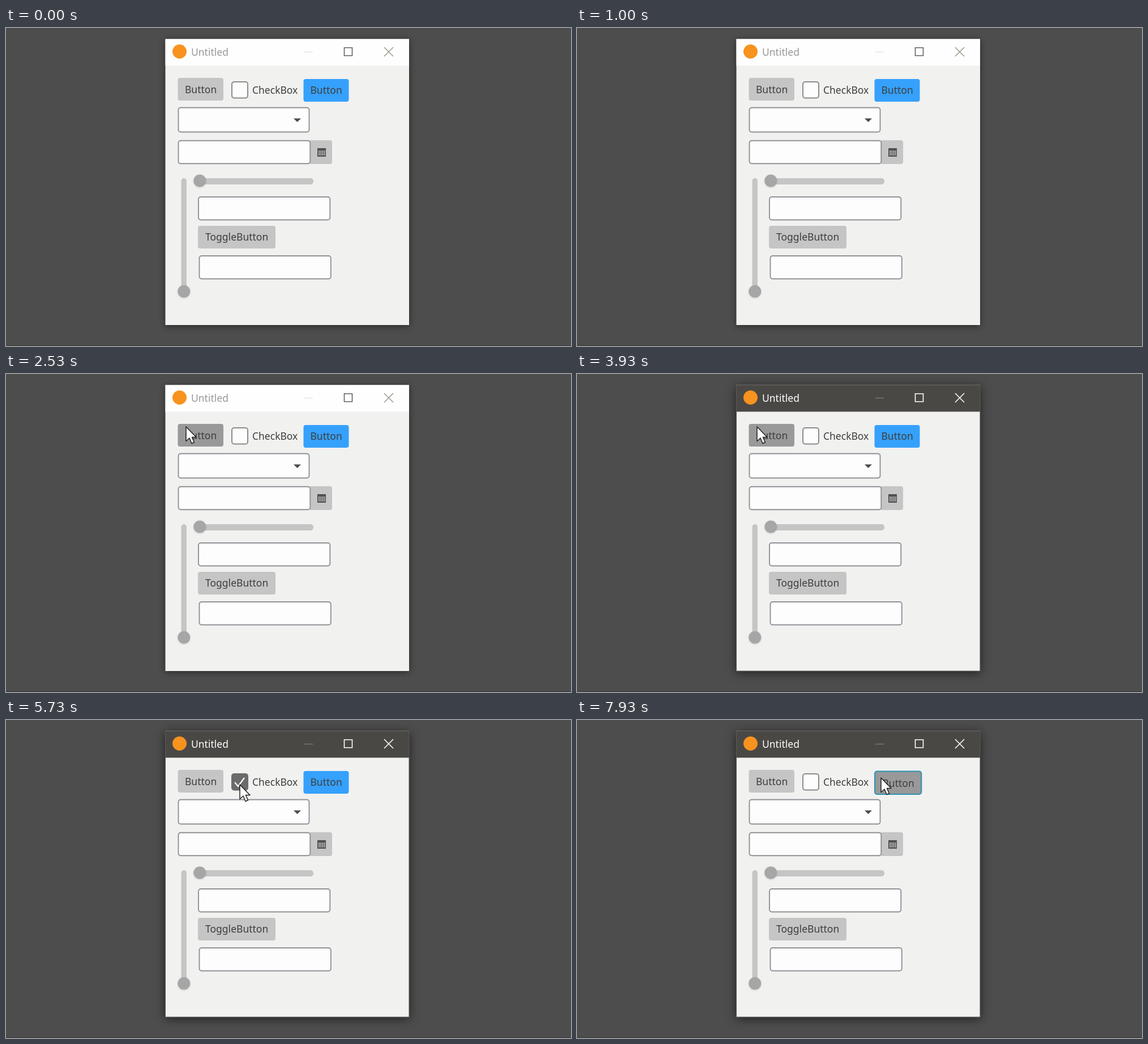
These frames come from a looping animation (998 px wide and 561 px high, 8 s). An HTML page:

```html
<!DOCTYPE html>
<html lang="en">
<head>
<meta charset="utf-8">
<style>
  html, body { margin: 0; width: 100%; height: 100%; overflow: hidden; background: #4d4d4d; }
  svg { display: block; }
  text { font: 17.5px "Noto Sans", "Open Sans", sans-serif; fill: #3e3e3e; }
  .face { fill: #c5c5c5; }
  .field { fill: #fdfdfd; stroke: #929095; stroke-width: 1.9; }
  .thumb { fill: #a6a6a6; filter: drop-shadow(0 1px 1.5px #0002); }
  #shadow { fill: #f1f1f0; filter: drop-shadow(0 2px 6px #0007); }
  #bar { fill: #fefefe; }
  #title { fill: #989898; }
  #minimize { stroke: #e6e6df; }
  #maximize { stroke: #62625e; }
  #close { stroke: #9b9b91; }
  #frame { stroke: none; }
  .active #shadow { filter: drop-shadow(0 3px 9px #0009); }
  .active #bar { fill: #4a4845; }
  .active #title { fill: #fff; }
  .active #minimize { stroke: #77736f; }
  .active #maximize, .active #close { stroke: #fff; }
  .active #frame { stroke: #5d5b59; }
</style>
</head>
<body>
<svg id="stage" width="998" height="561" viewBox="0 0 998 561">
  <rect width="998" height="561" fill="#4d4d4d"/>
  <rect y="560" width="998" height="1" fill="#383838"/>

  <rect id="shadow" x="281.5" y="19.5" width="430.500" height="504.500"/>
  <rect id="bar" x="281.5" y="19.5" width="430.500" height="47"/>
  <rect id="frame" x="281.5" y="19" width="430.500" height="505" fill="none"/>
  <circle cx="306.5" cy="41.5" r="12.5" fill="#f7931e"/>
  <text id="title" x="327" y="49">Untitled</text>
  <g fill="none" stroke-width="1.6">
    <path id="minimize" d="M527 42.5h15"/>
    <path id="maximize" d="M597.5 34.7h14v14h-14z"/>
    <path id="close" d="M668 34l16 16m0-16l-16 16"/>
  </g>

  <rect id="plain" x="303.5" y="88" width="80.5" height="40" rx="4"/>
  <text x="316" y="114.5">Button</text>
  <rect id="box" x="399" y="95" width="28" height="28.5" rx="4" stroke-width="2"/>
  <path id="tick" d="M404 110l6 7 11-15" fill="none" stroke="#fff" stroke-width="2.2"/>
  <text x="435" y="116">CheckBox</text>
  <rect id="accent" rx="4" stroke-width="2"/>
  <text id="accentText">Button</text>

  <rect class="field" x="304.5" y="140.500" width="231" height="43" rx="4"/>
  <path d="M508 159.500h13l-6.500 6.500z" fill="#4c4c4c"/>

  <path class="face" d="M537 198h35q4 0 4 4v34q0 4-4 4h-35z"/>
  <rect class="field" x="304.5" y="198.800" width="232.800" height="40.500" rx="4"/>
  <path d="M550 212h15v15h-15z" fill="#505050"/>
  <path d="M552 217.500h11.500M552 220.500h11.500M552 223.500h11.500" stroke="#d8d8d8" stroke-width="1.900" stroke-dasharray="2 1.200"/>

  <rect class="face" x="332" y="265" width="211" height="11" rx="5"/>
  <circle class="thumb" cx="342.300" cy="269.500" r="11"/>
  <rect class="face" x="309.500" y="265" width="9.500" height="210" rx="4.700"/>
  <circle class="thumb" cx="314.300" cy="464.800" r="11"/>

  <rect class="field" x="340" y="298" width="232.300" height="40.500" rx="4"/>
  <rect class="face" x="339" y="349" width="137" height="40" rx="4"/>
  <text x="352" y="375">ToggleButton</text>
  <rect class="field" x="341.500" y="402" width="232.300" height="40.500" rx="4"/>

  <path id="cursor" d="M0 0V25.500L6 20l4 9.500 4.500-2-4-9H18z" fill="#fff" stroke="#202020" stroke-width="1.500" stroke-linejoin="round"/>
</svg>
<script>
const LOOP = 8000;
const el = id => document.getElementById(id);
const set = (id, attrs) => {
  for (const name in attrs) el(id).setAttribute(name, attrs[name]);
};
const within = (t, from, to) => t >= from && t < to;

// Each move: start time, end time, destination x, y.
const entry = [262, -32];
const moves = [
  [1720, 2350, 318, 93],
  [4230, 4950, 413, 114],
  [6550, 7030, 518, 105],
  [7100, 7400, 537, 102]
];

function cursorAt(t) {
  let [x, y] = entry;
  for (const [start, end, toX, toY] of moves) {
    const p = Math.min(1, Math.max(0, (t - start) / (end - start)));
    const eased = p * p * (3 - 2 * p);
    x += (toX - x) * eased;
    y += (toY - y) * eased;
  }
  return [x, y];
}

function draw(t) {
  const [x, y] = cursorAt(t);
  const over = (left, top, right, bottom) => x >= left && x < right && y >= top && y < bottom;

  el('stage').classList.toggle('active', t >= 2570);
  set('cursor', { transform: `translate(${x} ${y})` });

  const plainDown = within(t, 2500, 2900) || within(t, 3650, 4150);
  set('plain', {
    fill: plainDown ? '#999' : '#c5c5c5',
    stroke: !plainDown && over(303, 88, 384, 128) ? '#8a8a8a' : 'none'
  });

  const checked = within(t, 5250, 6250);
  const boxHover = over(398, 94, 516, 125);
  set('box', {
    fill: checked ? '#6c6b6c' : '#fdfdfd',
    stroke: checked ? '#6c6b6c' : boxHover ? '#606060' : '#8b8b8b'
  });
  set('tick', { visibility: checked ? 'visible' : 'hidden' });

  const accentHover = over(525, 90, 606, 130);
  const accentDown = t >= 7700;
  set('accent', {
    x: accentHover ? 526 : 525.5,
    y: accentHover ? 90.5 : 90,
    width: accentHover ? 82.3 : 80,
    height: accentHover ? 40.5 : 40,
    fill: accentDown ? '#999' : '#35a1fc',
    stroke: accentHover ? '#2b93b0' : 'none'
  });
  set('accentText', { x: accentHover ? 539.5 : 537.5, y: accentHover ? 117.5 : 116 });
}

function tick() {
  draw(performance.now() % LOOP);
  requestAnimationFrame(tick);
}
tick();
</script>
</body>
</html>
```
